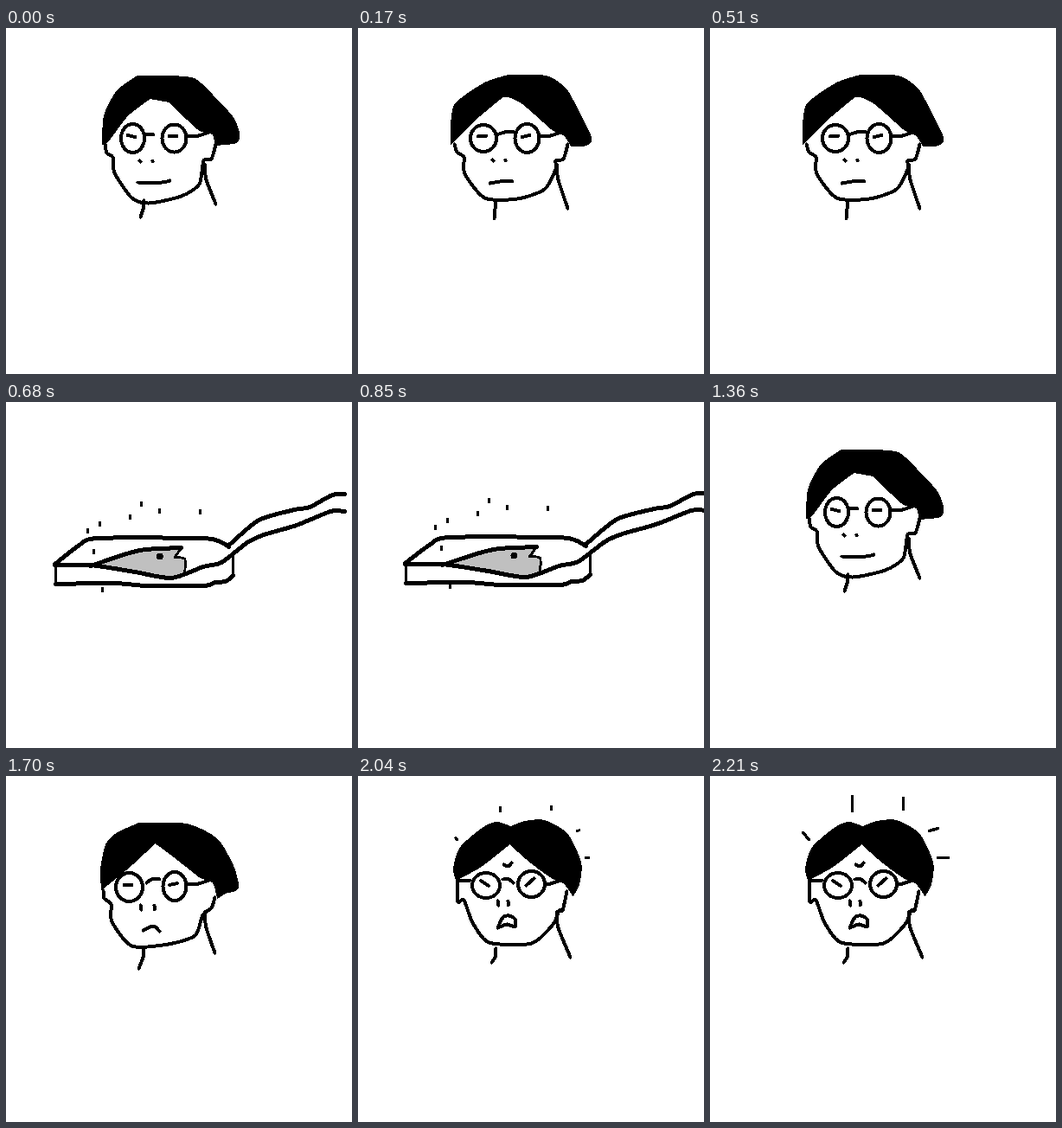
An HTML page for the animation above (2380 ms loop, 400x400 px).

```html
<!DOCTYPE html>
<html lang="en">
<head>
<meta charset="utf-8">
<title>Fish supper</title>
<style>
  html, body { margin: 0; width: 100%; height: 100%; overflow: hidden; background: #fff; }
  svg { display: block; width: 100vw; height: 100vh; }
  g { fill: none; stroke: #000; stroke-linecap: round; stroke-linejoin: round; }
</style>
</head>
<body>
<svg id="stage" viewBox="0 0 400 400" shape-rendering="crispEdges"></svg>
<script>
const STEP = 170;
const ORDER = ['calm', 'wry', 'calm', 'wry', 'panA', 'panB', 'panA', 'panB',
               'calm', 'wry', 'sad', 'gasp', 'shock', 'shout'];

// Soft curve through a few key points.
function bend(text) {
  const pts = text.split(' ').map(p => p.split(',').map(Number));
  const mix = (p, a, b) => p.map((v, i) => v + (b[i] - a[i]) / 8);
  return pts.slice(1).map((end, i) => {
    const from = pts[i], before = pts[i - 1] || from, after = pts[i + 2] || end;
    return `C${mix(from, before, end)} ${mix(end, after, from)} ${end}`;
  }).join('');
}

// Consecutive pieces share an end point, which stays a sharp corner.
const path = pieces => `M${pieces[0].split(' ')[0]}${pieces.map(bend).join('')}`;
const stroke = (text, width = 4) => `<path d="${path([text])}" stroke-width="${width}"/>`;
const fill = (pieces, color) => `<path d="${path(pieces)}Z" fill="${color}" stroke="${color}"/>`;
const move = (transform, body) => `<g transform="${transform}">${body}</g>`;
const dash = (x, y, dx, dy, width) => stroke(`${x},${y} ${x + dx},${y + dy}`, width);

function lens([x, y, rx, ry], tilt) {
  const half = 4.5;
  return `<ellipse cx="${x}" cy="${y}" rx="${rx}" ry="${ry}" stroke-width="4"/>` +
    dash(x - 1.5 - half, y - 2.5 - tilt, 2 * half, 2 * tilt);
}

function head({ hair, jaw, neck, lenses, tilts, bridge, nose, mouth }) {
  const [noseX, noseY, gap, height] = nose;
  const [x, , rx] = lenses[1];
  return fill(hair, '#000') + stroke(jaw) +
    stroke(`229,157 231,175 ${neck[0]}`) + stroke(`159,199 158,209 ${neck[1]}`) +
    lenses.map((l, i) => lens(l, tilts[i])).join('') +
    stroke(bridge) + stroke(`${x + rx + 2},125 222,124 234,120`) +
    dash(noseX, noseY, 1, height) + dash(noseX + gap, noseY, 0, height) +
    stroke(mouth);
}

const calm = {
  hair: ['111,134 113,101 128,72 151,55', '151,55 180,55 217,58 243,82 262,103 269,121 266,132 242,135',
         '242,135 238,122 222,117 188,85', '188,85 166,81', '166,81 140,101 118,130 111,134'],
  jaw: '114,134 116,144 123,149 125,167 145,196 165,202 202,194 223,180 228,153 237,151 242,134',
  neck: ['242,203', '155,218'],
  lenses: [[146, 127, 13.5, 16.5], [194, 127, 14, 16]],
  tilts: [1, 0],
  bridge: '160,122 170,123',
  nose: [154, 153, 15, 1],
  mouth: '152,178 180,178 189,176'
};

const wry = {
  hair: ['107,134 107,113 112,87 146,63 173,54', '173,54 217,55 240,70 254,95 269,126 264,135 246,136',
         '246,136 238,124 224,117 191,88 174,79', '174,79 167,79', '167,79 137,104 107,134'],
  jaw: '111,134 114,143 122,149 123,168 146,196 184,197 215,186 228,163 228,153 237,151 242,134',
  neck: ['242,208', '157,220'],
  lenses: [[144.5, 127, 15, 15.5], [195, 127, 14, 16.5]],
  tilts: [0, -1],
  bridge: '160,123 169,120 180,120',
  nose: [155, 152, 15, 1],
  mouth: '152,179 164,177 178,177'
};

const sad = {
  hair: ['110,130 109,108 115,79 127,66 153,54', '153,54 208,55 243,72 262,103 268,125 265,132 253,135 244,141',
         '244,141 239,123 224,117', '224,117 191,91 172,77', '172,77 143,104 110,131'],
  jaw: '112,132 113,141 121,148 122,168 145,196 187,194 218,184 227,160 237,152 241,140',
  neck: ['241,204', '153,222'],
  lenses: [[142, 128, 15.5, 16.5], [194.5, 127, 13.5, 16.5]],
  tilts: [0, -1],
  bridge: '162,123 168,119 177,119',
  nose: [155, 149, 16, 5],
  mouth: '158,178 166,174 172,174 177,179'
};

const shock = {
  hair: ['113,120 110,106 118,82 143,60 160,53 176,58', '176,58 193,52 215,51 241,66 257,99 255,125 248,138',
         '248,138 238,124 223,117 196,97 175,78', '175,78 142,104 113,120'],
  jaw: '115,120 115,145 122,143 132,169 151,192 200,193 225,171 232,155 236,155 241,133',
  neck: ['245,209', '154,215'],
  lenses: [[147.5, 126, 16, 14.5], [200, 124.5, 15.5, 15]],
  tilts: [3, -4],
  bridge: '167,119 174,119 179,123',
  nose: [161, 144, 12, 5],
  mouth: '161,175 167,163 174,161 181,165 181,174 172,171 161,175'
};

const gasp = { ...shock, mouth: sad.mouth };
const startled = head(shock) + dash(116, 120, 13, 0) + stroke('168,102 173,104 177,100');

const fishTop = '97,188 140,174 163,169 206,167';
const fishTail = '206,167 198,178';
const fishEnd = '198,178 210,180 210,196';
const pan =
  fill([fishTop, fishTail, fishEnd, '210,196 195,201 150,195 97,188'], '#c0c0c0') +
  ['54,186 82,165 105,156 228,156 250,159 263,166',
   '263,164 299,135 342,123 360,120 387,106 402,105',
   '402,125 385,125 344,141 305,152 285,161 254,184 232,189 194,202 150,195 97,187 54,187',
   '55,209 125,208 165,211 233,211 246,207 259,206 268,199',
   fishTop].map(text => stroke(text, 5)).join('') +
  [fishTail, fishEnd, '55,187 55,209', '268,199 268,173'].map(text => stroke(text, 3)).join('') +
  '<circle cx="180" cy="177" r="4" fill="#000" stroke="none"/>';

const drops = [[89, 143], [103, 135], [138, 127], [151, 112], [172, 120], [219, 121], [96, 167], [106, 211]]
  .map(([x, y]) => dash(x, y, 0, 3, 3)).join('');

// Surprise marks around the hair, from small to full size.
const rays = (size, width) =>
  [[164, 40, 0, -17], [223, 38, 0, -13], [253, 63, 10, -3], [263, 94, 12, 0], [114, 73, -7, -8]]
    .map(([x, y, dx, dy]) => dash(x, y, dx * size, dy * size, width)).join('');

const scenes = {
  calm: head(calm),
  wry: head(wry),
  sad: head(sad),
  gasp: move('translate(4 -1)', head(gasp)),
  shock: startled + rays(.25, 3),
  shout: startled + rays(1, 3.5),
  panA: move('translate(4 1) scale(.963 1)', pan) + move('translate(5 4)', drops),
  panB: pan + drops
};

const stage = document.getElementById('stage');
stage.innerHTML = Object.entries(scenes)
  .map(([name, body]) => `<g id="${name}" visibility="hidden" transform="translate(.5 .5)">${body}</g>`)
  .join('');

let shown;
const start = performance.now();

function show(now) {
  const elapsed = Math.max(0, now - start);
  const name = ORDER[Math.floor(elapsed / STEP) % ORDER.length];
  if (name !== shown) {
    if (shown) document.getElementById(shown).setAttribute('visibility', 'hidden');
    document.getElementById(name).setAttribute('visibility', 'visible');
    shown = name;
  }
  requestAnimationFrame(show);
}
show(start);
</script>
</body>
</html>
```
